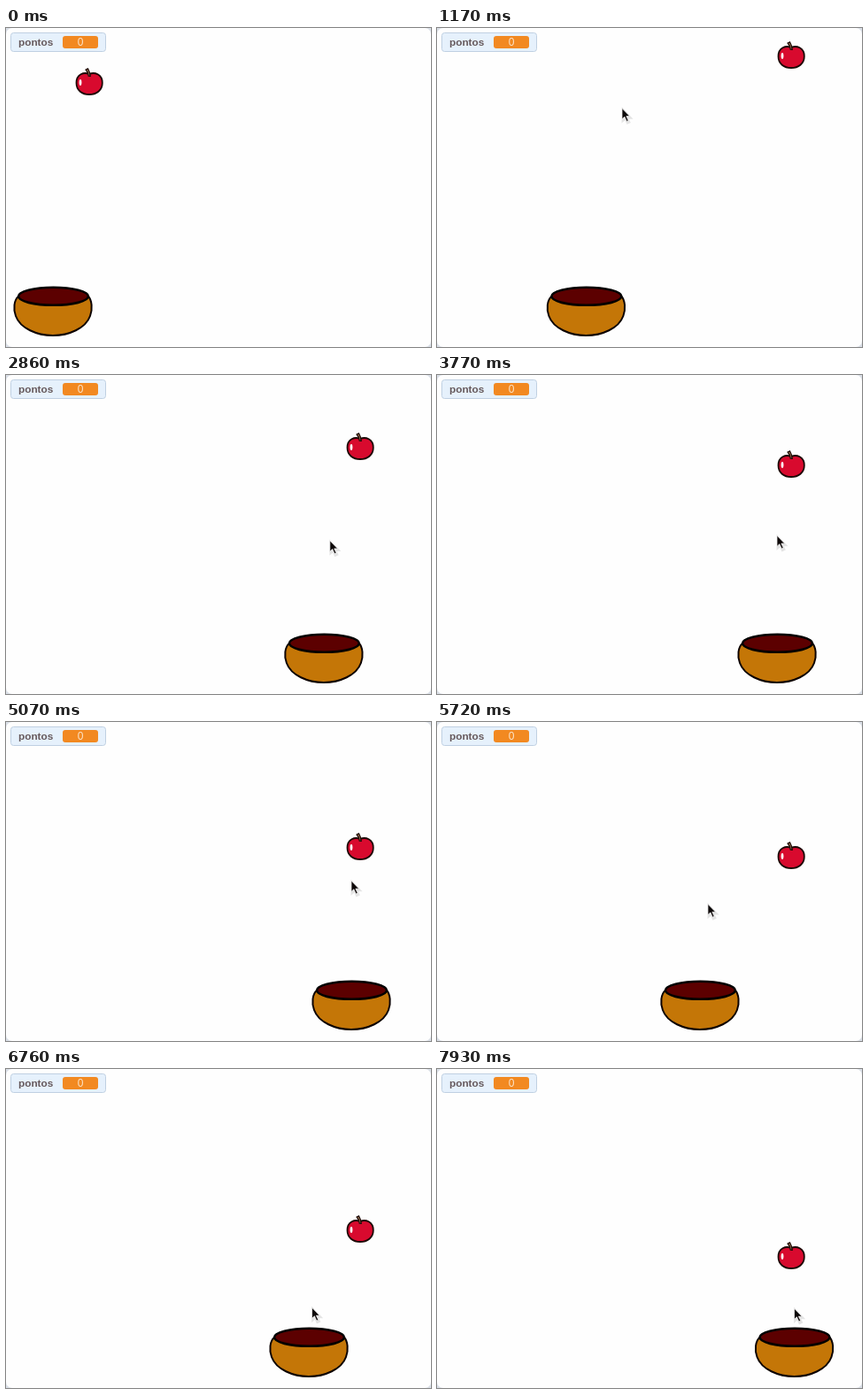
Recreate the animation shown at these times as an HTML page. Size 480 by 360 pixels, loop 8000 ms.

```html
<!DOCTYPE html>
<html lang="pt">
<head>
<meta charset="utf-8">
<style>
  html, body { margin: 0; width: 100%; height: 100%; overflow: hidden; background: #d9dee6; }
  svg { display: block; width: 480px; height: 360px; }
  text { font: 12px "Liberation Sans", Arial, sans-serif; }
</style>
</head>
<body>
<svg viewBox="0 0 480 360">
  <rect width="480" height="360" rx="7" fill="#fefefe"/>

  <rect x="5.5" y="5.5" width="107" height="21" rx="3" fill="#e6f1fc" stroke="#bfd0e2"/>
  <text x="14" y="20" fill="#66595c" style="font-weight:bold;font-size:11.8px">pontos</text>
  <rect x="64" y="9" width="40" height="14" rx="3" fill="#f28921"/>
  <text x="84" y="20" fill="#fbe3c8" text-anchor="middle">0</text>

  <g id="bowl" stroke="#0c0200" stroke-width="2" stroke-linejoin="round">
    <path fill="#c47607" d="M-39 0C-44 4 -45 14 -42 22C-37 36 -18 44 0 44C18 44 37 36 42 22C45 14 44 4 40 0Z"/>
    <ellipse cx=".5" cy="-.2" rx="39.500" ry="10" fill="#5c0000" stroke="#000" stroke-width="2.600"/>
  </g>

  <g id="apple" stroke="#1c0805" stroke-width="1.800" stroke-linejoin="round">
    <path fill="#d80a2e" d="M0 -9C-6 -11.500 -14.500 -9 -14.500 1C-14.500 9.500 -8 14 0 14C8 14 14.800 9.500 14.800 1C14.800 -9 6 -11.500 0 -9Z"/>
    <path fill="#94704f" stroke-width="1.200" d="M-4 -14L-1.500 -15.300Q1 -11 1.300 -6.500L-0.800 -6.800Q-1 -11 -4 -14Z"/>
    <ellipse cx="-10" cy=".5" rx="1.400" ry="3.400" fill="#fff" stroke="none"/>
  </g>

  <g id="mouse">
    <g transform="translate(0 1.200) scale(.87)">
      <path d="M1 2V16L4.300 13L7 19L9.300 18L6.600 12.300H11Z" fill="none" stroke="#000" stroke-opacity=".1" stroke-width="3"/>
      <path d="M0 0V14L3.300 11L6 17L8.300 16L5.600 10.300H10Z" fill="#0d0808" stroke="#fff" stroke-width=".8"/>
    </g>
  </g>
</svg>
<script>
const LOOP = 8000, STEP = 130;

// pointer glides: start time, end time, destination x, y
const glides = [
  [260, 2040, 352.4, 190],
  [2400, 3400, 384, 180],
  [3900, 4900, 390, 178],
  [5070, 5340, 291.7, 179],
  [5340, 6340, 342, 268],
  [6630, 7280, 403.5, 269]
];

const clamp = k => Math.min(1, Math.max(0, k));
const ease = k => k ** 3 * (10 - 15 * k + 6 * k * k);

function pointer(t) {
  let x = 53, y = -20;
  for (const [from, to, endX, endY] of glides) {
    const k = ease(clamp((t - from) / (to - from)));
    x += (endX - x) * k;
    y += (endY - y) * k;
  }
  return [x, y];
}

function place(id, x, y) {
  document.getElementById(id).setAttribute("transform", `translate(${x} ${y})`);
}

function draw(now) {
  const t = Math.floor(now % LOOP / STEP) * STEP;
  place("mouse", ...pointer(t));
  place("bowl", pointer(t - STEP)[0], 303);   // follows one step behind
  if (t < STEP) place("apple", 94, 61);
  else place("apple", 400, 51 + 10 * Math.floor((t - 1655) / 373));
}

const start = performance.now();
function tick() {
  draw(performance.now() - start);
  requestAnimationFrame(tick);
}
tick();
</script>
</body>
</html>
```
